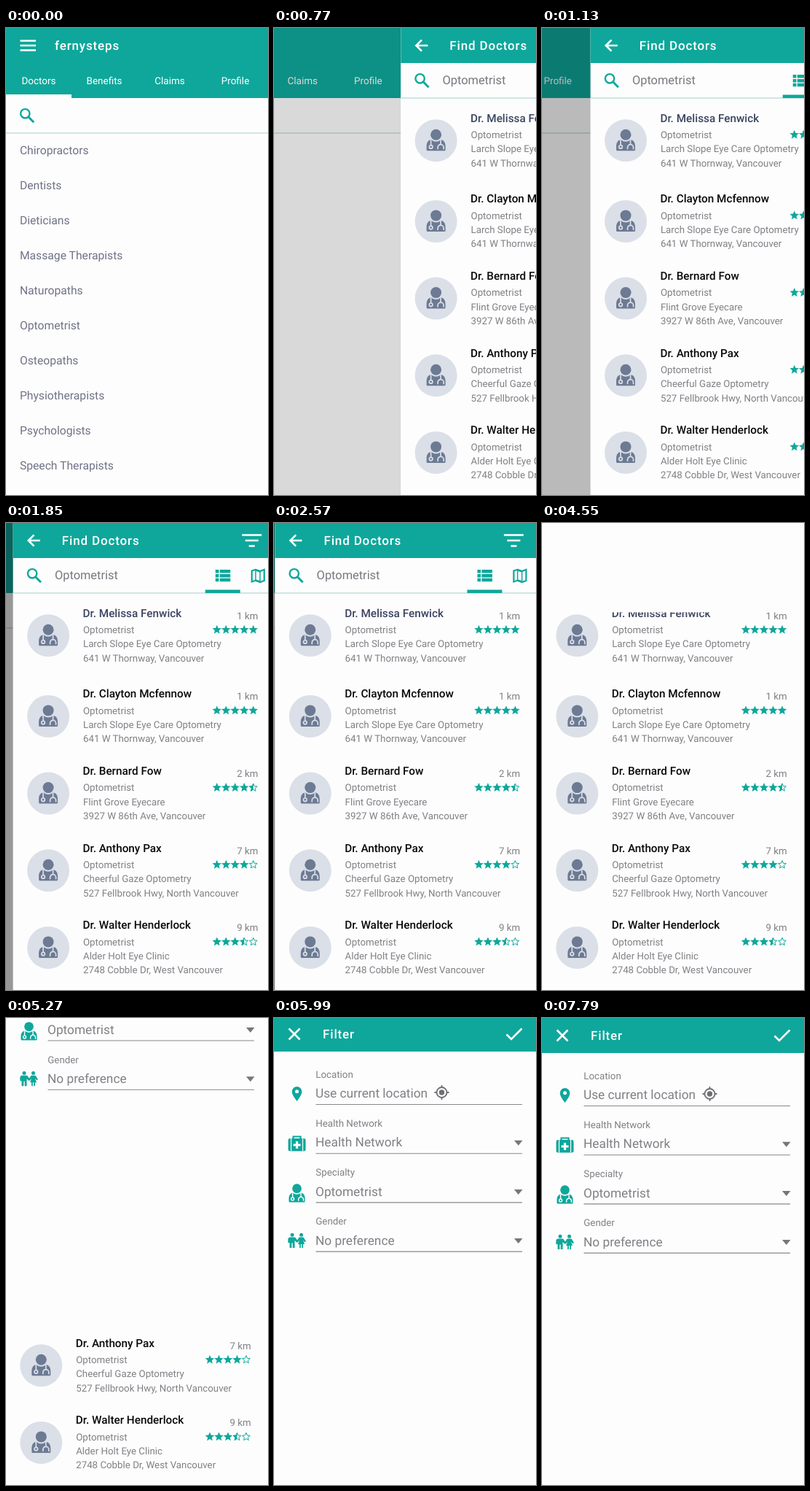
Write an HTML page that moves like this. It is 360x640 px and loops after 8 s.

```html
<!DOCTYPE html>
<html lang="en">
<head>
<meta charset="utf-8">
<title>Find Doctors</title>
<style>
  html, body { margin: 0; height: 100%; overflow: hidden; background: #fdfdfd; }
  svg { display: block; width: 100vw; height: 100vh; }
  text { font: 400 13.3px Roboto, sans-serif; fill: #808086; white-space: pre; text-rendering: geometricPrecision; }
  .paper { fill: #fdfdfd; }
  .teal { fill: #0fa79b; }
  .white { fill: #fff; }
  .line { fill: none; stroke: #0fa79b; }
  .mark { fill: none; stroke: #fff; stroke-width: 2.6; }
  .rule { stroke: #a3cfca; }
  .field { stroke: #88888c; stroke-width: 1.1; }
  .title { font-size: 17px; font-weight: 500; letter-spacing: .85px; fill: #fff; }
  .tab { font-size: 13.5px; fill: #fff; text-anchor: middle; }
  .kind { font-size: 15.7px; fill: #707286; }
  .query { font-size: 16.4px; fill: #77777f; }
  .name { font-size: 15.3px; font-weight: 500; fill: #0a0a0c; }
  .name.first { fill: #3c4562; }
  .km { text-anchor: end; }
  .value { font-size: 17.3px; }
</style>
</head>
<body>
<svg viewBox="0 0 360 640">
  <defs>
    <g id="search" fill="none" stroke="#0fa79b" stroke-width="2.4">
      <circle cx="-2.7" cy="-2.7" r="6.2"/>
      <path d="M2 2L9.2 9.2" stroke-width="3"/>
    </g>
    <g id="doctor">
      <circle cy="-8" r="7.5" fill="currentColor"/>
      <path d="M-11.5 14Q-13 14-13 12.500V8C-13 2-10-1-6.500-1Q0 4 6.500-1C10-1 13 2 13 8V12.500Q13 14 11.500 14Z" fill="currentColor"/>
      <g fill="none" stroke="var(--gap)" stroke-width="1.7">
        <path d="M-7-1V6.500M6.500-1V5M2.500 12V9.500A4 4 0 0 1 10.500 9.500V12"/>
        <circle cx="-7" cy="8.700" r="2.300"/>
      </g>
    </g>
  </defs>

  <g id="home">
    <rect class="paper" width="360" height="640"/>
    <rect class="teal" width="360" height="96"/>
    <rect class="white" y="91" width="90" height="5"/>
    <path class="mark" d="M19.500 17.500H41M19.500 24H41M19.500 30.500H41"/>
    <text class="title" x="67" y="29.500">fernysteps</text>
    <use href="#search" x="29" y="120"/>
    <path class="rule" d="M0 144H360"/>
    <g id="kinds"></g>
    <rect id="dim" width="360" height="640"/>
  </g>

  <g id="results">
    <rect class="paper" width="360" height="640"/>
    <rect class="teal" width="360" height="48"/>
    <path class="mark" d="M37 24H21.500M28.700 16.300L21 24L28.700 31.700M314.500 16.500H341.500M319 24H337M324 31.500H332"/>
    <text class="title" x="67" y="29.500">Find Doctors</text>
    <use href="#search" x="29" y="72"/>
    <text class="query" x="57.200" y="77.300">Optometrist</text>
    <path class="line" stroke-width="4.500" d="M278 66.300H282.700M284 66.300H298.500M278 72.200H282.700M284 72.200H298.500M278 78.100H282.700M284 78.100H298.500"/>
    <path class="line" stroke-width="2.200" d="M328 65.500L333 63.800L339.500 66L345 63.800V79L339.500 81L333 78.800L328 80.500Z"/>
    <path class="teal" d="M332.500 63L340 65.500V82L332.500 79.500Z"/>
    <path class="paper" d="M334 66L338.500 67.500V79L334 77.500Z"/>
    <path class="rule" d="M0 96H360"/>
    <rect class="teal" x="264" y="91.500" width="48" height="4.500"/>
    <g id="cards"></g>
  </g>

  <g id="filter">
    <rect class="paper" width="360" height="640"/>
    <rect class="teal" width="360" height="48"/>
    <path class="mark" d="M20.500 16.500L35.500 31.500M35.500 16.500L20.500 31.500M319.500 24.500L326 31L340.500 16.500"/>
    <text class="title" x="67" y="29.500">Filter</text>
    <g id="fields"></g>
    <g fill="none" stroke="#707074" stroke-width="1.800">
      <circle cx="230.500" cy="104" r="7"/>
      <path d="M230.500 94V97.500M230.500 110.500V114M220.500 104H224M237 104H240.500"/>
      <circle cx="230.500" cy="104" r="3.700" fill="#707074" stroke="none"/>
    </g>
    <path class="teal" fill-rule="evenodd" d="M31.500 116C28 111 24.700 107 24.700 102.700A6.800 6.800 0 0 1 38.300 102.700C38.300 107 35 111 31.500 116ZM31.500 100.200A2.500 2.500 0 1 0 31.500 105.200A2.500 2.500 0 1 0 31.500 100.200Z"/>
    <g>
      <path class="line" stroke-width="2.200" d="M26.500 168V164.500H36.500V168"/>
      <rect class="teal" x="19.500" y="167" width="24" height="17.500" rx="2.500"/>
      <path d="M23.500 167V184.500M39.500 167V184.500" stroke="#fdfdfd" stroke-width="1.200"/>
      <path d="M31.500 171V181M26.500 176H36.500" stroke="#fdfdfd" stroke-width="3.200"/>
    </g>
    <use href="#doctor" transform="translate(31.500 242.500) scale(.85)" style="color:#0fa79b;--gap:#fdfdfd"/>
    <g class="teal">
      <circle cx="25" cy="299.300" r="2.500"/>
      <circle cx="37.500" cy="299.300" r="2.500"/>
      <path d="M21 302.500H29L32 306.500L34.500 302.500H40.500L44 308L42.200 309.200L40 306.500L42 312H40V317H38.200V312H36.800V317H35V312H33L35 306.500L32.700 309.500H31L28.500 307V317H25.700V310.500H24.300V317H21.500V307V310H19.300V304.500Z"/>
    </g>
  </g>
</svg>
<script>
const $ = id => document.getElementById(id);
const label = (cls, x, y, s) => `<text class="${cls}" x="${x}" y="${y}">${s}</text>`;

const tabs = ['Doctors', 'Benefits', 'Claims', 'Profile'];
const kinds = ['Chiropractors', 'Dentists', 'Dieticians', 'Massage Therapists', 'Naturopaths',
  'Optometrist', 'Osteopaths', 'Physiotherapists', 'Psychologists', 'Speech Therapists'];
const doctors = [
  [0, 'Melissa Fenwick', 'Larch Slope Eye Care Optometry', '641 W Thornway, Vancouver', 1, 5],
  [110.7, 'Clayton Mcfennow', 'Larch Slope Eye Care Optometry', '641 W Thornway, Vancouver', 1, 5],
  [216.4, 'Bernard Fow', 'Flint Grove Eyecare', '3927 W 86th Ave, Vancouver', 2, 4.5],
  [322, 'Anthony Pax', 'Cheerful Gaze Optometry', '527 Fellbrook Hwy, North Vancouver', 7, 4],
  [427.7, 'Walter Henderlock', 'Alder Holt Eye Clinic', '2748 Cobble Dr, West Vancouver', 9, 3.5],
];
const fields = [['Location', 'Use current location'], ['Health Network', 'Health Network'],
  ['Specialty', 'Optometrist'], ['Gender', 'No preference']];

// Star outline of ten points; half keeps the left side only
function star(cx, cy, r, half) {
  const pts = [];
  for (let i = half ? 5 : 0; i <= 10; i++) {
    const a = i * Math.PI / 5, d = i % 2 ? r * .45 : r;
    pts.push((cx + d * Math.sin(a)).toFixed(2) + ',' + (cy - d * Math.cos(a)).toFixed(2));
  }
  return pts.join(' ');
}

function rating(score, y) {
  let out = '';
  for (let i = 0; i < 5; i++) {
    const x = 280 + 12.5 * i, rest = score - i;
    if (rest >= 1) out += `<polygon class="teal" points="${star(x, y, 6.6)}"/>`;
    else {
      out += `<polygon class="line" points="${star(x, y, 5.7)}"/>`;
      if (rest > 0) out += `<polygon class="teal" points="${star(x, y, 6.3, true)}"/>`;
    }
  }
  return out;
}

const card = ([y, name, clinic, address, km, score], i) => `<g transform="translate(0 ${y})">
  <circle cx="48.300" cy="154.200" r="29" fill="#dbdfe8"/>
  <use href="#doctor" x="48.300" y="154.200" style="color:#6c7a93;--gap:#dbdfe8"/>
  ${label(i ? 'name' : 'name first', 95.8, 128.7, 'Dr. ' + name)}
  ${label('', 96.2, 151, 'Optometrist')}${label('', 96.2, 170.4, clinic)}${label('', 96.2, 189.5, address)}
  ${label('km', 336.7, 131.7, km + ' km')}${rating(score, 146.3)}</g>`;

const field = ([title, value], i) => {
  const y = 67.2 * i;
  return label('', 57.3, 83.8 + y, title) + label('value', 57, 111.2 + y, value) +
    `<path class="field" d="M57.500 ${120.500 + y}H341"/>` +
    (i ? `<path fill="#77777b" d="M330 ${102.500 + y}h11.500l-5.700 7z"/>` : '');
};

$('kinds').innerHTML = tabs.map((s, i) => label('tab', 45 + 90 * i, 76.6, s)).join('') +
  kinds.map((s, i) => label('kind', 18.9, 173 + 48 * i, s)).join('');
$('cards').innerHTML = doctors.map(card).join('');
$('fields').innerHTML = fields.map(field).join('');

const LOOP = 8000, STEP = 90, PUSH = 500, DROP = 4250;
const move = (id, x, y) => $(id).setAttribute('transform', `translate(${x.toFixed(2)} ${y.toFixed(2)})`);

// Constant speed, then an even slowdown to rest
function dropped(t) {
  const speed = .408, ease = 240, arrive = 640 / speed;
  if (t <= 0) return 0;
  if (t < arrive - ease) return speed * t;
  const left = Math.max(0, arrive + ease - t);
  return 640 - speed * left * left / (4 * ease);
}

function draw(t) {
  const now = PUSH + Math.floor((t - PUSH) / STEP) * STEP;
  const age = Math.max(0, now - PUSH + 2);
  const x = t < PUSH ? 360 : now >= 3470 ? 0 : 360 * Math.exp(-age / 375);
  move('home', x - 360, 0);
  move('results', x, 0);
  $('dim').setAttribute('opacity', t < PUSH ? 0 : (.5 * (1 - Math.exp(-age / 830))).toFixed(3));
  move('filter', 0, dropped(now - DROP) - 640);
}

const start = performance.now();
function tick() {
  draw((performance.now() - start) % LOOP);
  requestAnimationFrame(tick);
}
tick();
</script>
</body>
</html>
```
